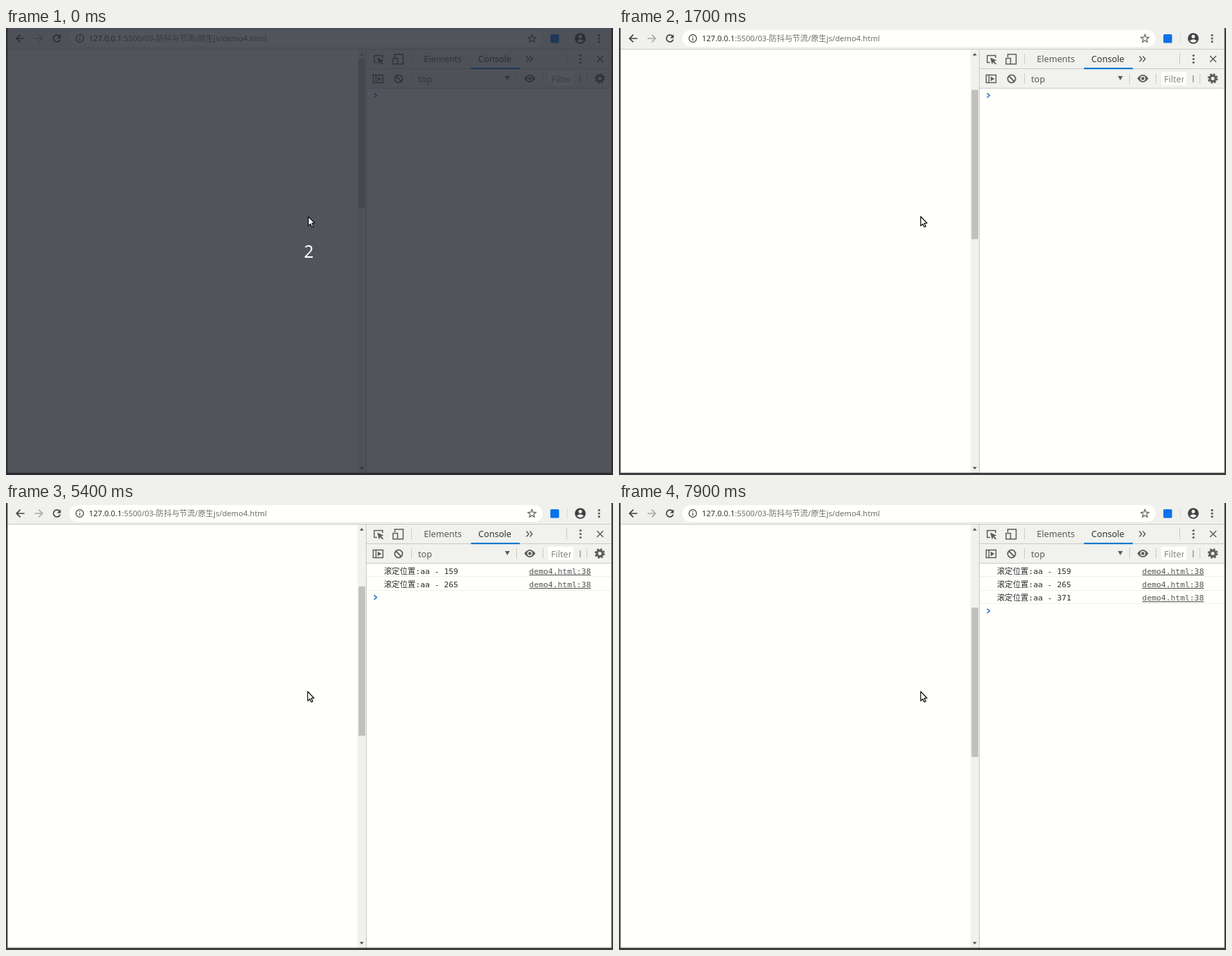
Recreate the animation shown at these times as an HTML page. Size 872 by 642 pixels, loop 8.2 s.

```html
<!DOCTYPE html>
<html lang="zh-CN">
<head>
<meta charset="utf-8">
<title>Scroll debounce demo</title>
<style>
  html, body { margin: 0; width: 100%; height: 100%; overflow: hidden; background: #fffffc; }
  svg { display: block; width: 872px; height: 642px; }
  text { white-space: pre; }
  .ui { font: 12.6px "Noto Sans", "Noto Sans CJK SC", sans-serif; fill: #5a5a5a; }
  .url { font-size: 11.2px; fill: #6d6e6c; }
  .log { font: 11.33px "DejaVu Sans Mono", "Noto Sans CJK SC", monospace; fill: #2d2d2d; }
  .link { fill: #545454; text-decoration: underline; }
  .bar { fill: #f1f1ee; }
  .edge { fill: #3c3d3e; }
  .rule { fill: #cacac7; }
  .white { fill: #fffffc; }
  .icon { fill: none; stroke: #5b5c5d; stroke-width: 1.5; }
  .dark { stroke: #3f4143; stroke-width: 1.7; }
  .solid { fill: #5b5c5d; }
  .blue { fill: none; stroke: #3377cf; stroke-width: 1.6; }
</style>
</head>
<body>
<svg viewBox="0 0 872 642" xmlns="http://www.w3.org/2000/svg">
  <rect class="white" width="872" height="642"/>

  <!-- browser toolbar -->
  <rect width="872" height="30" fill="#f0f0ed"/>
  <rect class="rule" y="30" width="872" height="1"/>
  <rect class="white" x="91" y="3" width="680" height="24" rx="12"/>
  <path class="icon dark" d="M26.5 15H15.5M20.5 9.7L15.2 15L20.5 20.3"/>
  <path class="icon dark" style="stroke:#a9aaa8" d="M41 15H52M47 9.7L52.3 15L47 20.3"/>
  <path class="icon dark" d="M77.2 12A5 5 0 1 0 77.9 16.5"/>
  <path d="M78.6 9.2V14.4H73.4Z" fill="#3f4143"/>
  <circle class="icon" cx="106" cy="15" r="5.4" stroke-width="1.3"/>
  <path class="icon" d="M106 14.3V18M106 11.7V13"/>
  <text class="ui url" x="119" y="19"><tspan fill="#333">127.0.0.1</tspan>:5500/03-防抖与节流/原生js/demo4.html</text>
  <path id="star" class="icon" style="stroke-width:1.2"/>
  <rect x="782" y="9" width="12.5" height="12.5" rx="1.5" fill="#0b72eb"/>
  <rect x="806" y="8" width="1" height="14" fill="#dadad7"/>
  <circle cx="825" cy="15" r="7.8" fill="#404244"/>
  <circle cx="825" cy="12.2" r="2.5" fill="#f0f0ed"/>
  <path d="M820 18.6Q825 13.8 830 18.6Q825 23.2 820 18.6Z" fill="#f0f0ed"/>

  <!-- page scrollbar -->
  <rect class="bar" x="505" y="31" width="12" height="608"/>
  <path id="up" d="M508 39.5L511 36L514 39.5Z"/>
  <path d="M508 630.5L511 634L514 630.5Z" fill="#505050"/>
  <rect id="thumb" x="506.4" width="9.6" height="214.5" fill="#c0c0bd"/>

  <!-- devtools -->
  <rect class="rule" x="517" y="31" width="1.2" height="608"/>
  <rect class="bar" x="518" y="31" width="352" height="55"/>
  <rect class="rule" x="518" y="58" width="352" height="1"/>
  <rect class="rule" x="518" y="86" width="352" height="1"/>
  <rect x="668" y="57" width="70" height="2.2" fill="#0a78cf"/>
  <path class="icon" d="M533 49.5H529V39.5H541V43"/>
  <path class="solid" d="M533.2 42.6L542.6 46.5L538.9 47.8L542.2 51.2L540.8 52.5L537.5 49.1L536 52.5Z"/>
  <path class="icon" d="M558.5 42V37.8H570.5V51.8H563M556 43.5H562.5V51.8H556Z"/>
  <text class="ui" x="600.3" y="49">Elements</text>
  <text class="ui" x="678.6" y="49" style="fill:#333">Console</text>
  <path class="icon" d="M747.5 40.5L751 44.5L747.5 48.5M752.5 40.5L756 44.5L752.5 48.5"/>
  <path class="icon" d="M849 40L858 49M858 40L849 49"/>
  <path class="icon" d="M527.5 67.5H541.5V78.5H527.5ZM531.5 67.5V78.5"/>
  <path class="solid" d="M534 69.7L539.5 73L534 76.3Z"/>
  <circle class="icon" cx="564" cy="73" r="5.6" style="stroke-width:1.8"/>
  <path class="icon" style="stroke-width:1.8" d="M560 69L568 77"/>
  <text class="ui" x="592" y="78">top</text>
  <path class="solid" d="M716.7 69H723.7L720.2 75Z"/>
  <path class="solid" d="M744.5 72.5Q752.5 61.5 760.5 72.5Q752.5 83.5 744.5 72.5Z"/>
  <circle class="bar" cx="752.5" cy="72.5" r="3.7"/>
  <circle class="solid" cx="752.5" cy="72.5" r="2.3"/>
  <rect class="white" x="779" y="63" width="36" height="19"/>
  <clipPath id="clip"><rect x="779" y="60" width="32.5" height="25"/></clipPath>
  <text class="ui" x="783" y="78" clip-path="url(#clip)" style="fill:#858582">Filter</text>
  <rect x="824.3" y="68" width="1.2" height="10" fill="#8f8178"/>
  <circle class="icon" cx="853" cy="72.5" r="4.1" style="stroke-width:3.2"/>
  <circle class="icon" cx="853" cy="72.5" r="6.3" style="stroke-width:2.2" stroke-dasharray="2.7 2.248"/>
  <g id="rules"></g>
  <g id="dots"></g>
  <g id="logs"></g>
  <path id="prompt" class="blue" d="M528.7 -3.2L532.5 0L528.7 3.2"/>

  <!-- window border -->
  <path class="edge" d="M0 0H2.3V638.7H869.7V0H872V642H0Z"/>

  <g id="countdown">
    <rect width="872" height="642" fill="rgb(39,42,52)" fill-opacity=".8"/>
    <text x="435" y="330" text-anchor="middle" fill="#fff" style="font:24.5px 'Noto Sans',sans-serif">2</text>
  </g>
  <path id="cursor" d="M.7 .8V14.2L3.7 11.4L5.8 15.8L8 14.8L5.9 10.5L9.8 10.2Z" fill="#fff" stroke="#17181a" stroke-width="1.3" stroke-linejoin="round"/>
</svg>
<script>
const LOOP = 8200;
const $ = id => document.getElementById(id);

// [time, value]: each value holds until the next time
const thumbTop = [
  [0, 43.4],
  [1000, 50], [1100, 62], [1200, 74], [1300, 83], [1400, 88], [1700, 88.8],
  [3400, 95], [3500, 104], [3600, 111], [3900, 119], [4100, 119.8],
  [5800, 127], [5900, 138], [6000, 147], [6100, 150.3]
];
const cursorAt = [
  [0, [433.6, 270]], [1000, [432.7, 270]],
  [7500, [405, 232]], [7600, [290, 130]], [7700, [140, 44]], [7800, [51, 2]],
  [7900, [432.7, 270]]
];
const logs = [[3300, 159], [5400, 265], [7400, 371]];

const at = (steps, t) => steps.filter(s => s[0] <= t).pop()[1];

$("star").setAttribute("d", "M" + Array.from({ length: 10 }, (_, i) => {
  const r = i % 2 ? 2.6 : 6, a = i * Math.PI / 5;
  return [755.5 + r * Math.sin(a), 15.3 - r * Math.cos(a)].map(v => v.toFixed(2)).join(" ");
}).join("L") + "Z");

const rule = (x, y, h) => `<rect class="rule" x="${x}" y="${y}" width="1" height="${h}"/>`;
$("rules").innerHTML = rule(582, 37, 15) + rule(805, 36, 16) +
  [582, 733, 771, 834].map(x => rule(x, 65, 15)).join("");

const kebab = (x, y, gap) => [-gap, 0, gap]
  .map(d => `<circle class="solid" cx="${x}" cy="${y + d}" r="1.6"/>`).join("");
$("dots").innerHTML = kebab(852, 15, 4.7) + kebab(825.3, 44.5, 5);

$("logs").innerHTML = logs.map(([, pos], i) => {
  const y = 101.8 + i * 19.2;
  return `<g><text class="log" x="543" y="${y}">滚定位置:aa - ${pos}</text>
    <text class="log link" x="751.6" y="${y}">demo4.html:38</text>
    <rect x="518" y="${Math.round(105.3 + i * 19.5)}" width="352" height="1" fill="#efefec"/></g>`;
}).join("");
const rows = [...$("logs").children];

function draw(t) {
  const count = logs.filter(l => l[0] <= t).length;
  $("countdown").style.display = t < 400 ? "" : "none";
  $("thumb").setAttribute("y", at(thumbTop, t));
  $("up").setAttribute("fill", t < 1000 ? "#a3a3a0" : "#505050");
  $("cursor").setAttribute("transform", `translate(${at(cursorAt, t)})`);
  $("prompt").setAttribute("transform", `translate(0 ${96.8 + count * 19.4})`);
  rows.forEach((row, i) => row.style.display = i < count ? "" : "none");
}

const start = performance.now();
function tick() {
  draw((performance.now() - start) % LOOP);
  requestAnimationFrame(tick);
}
tick();
</script>
</body>
</html>
```
